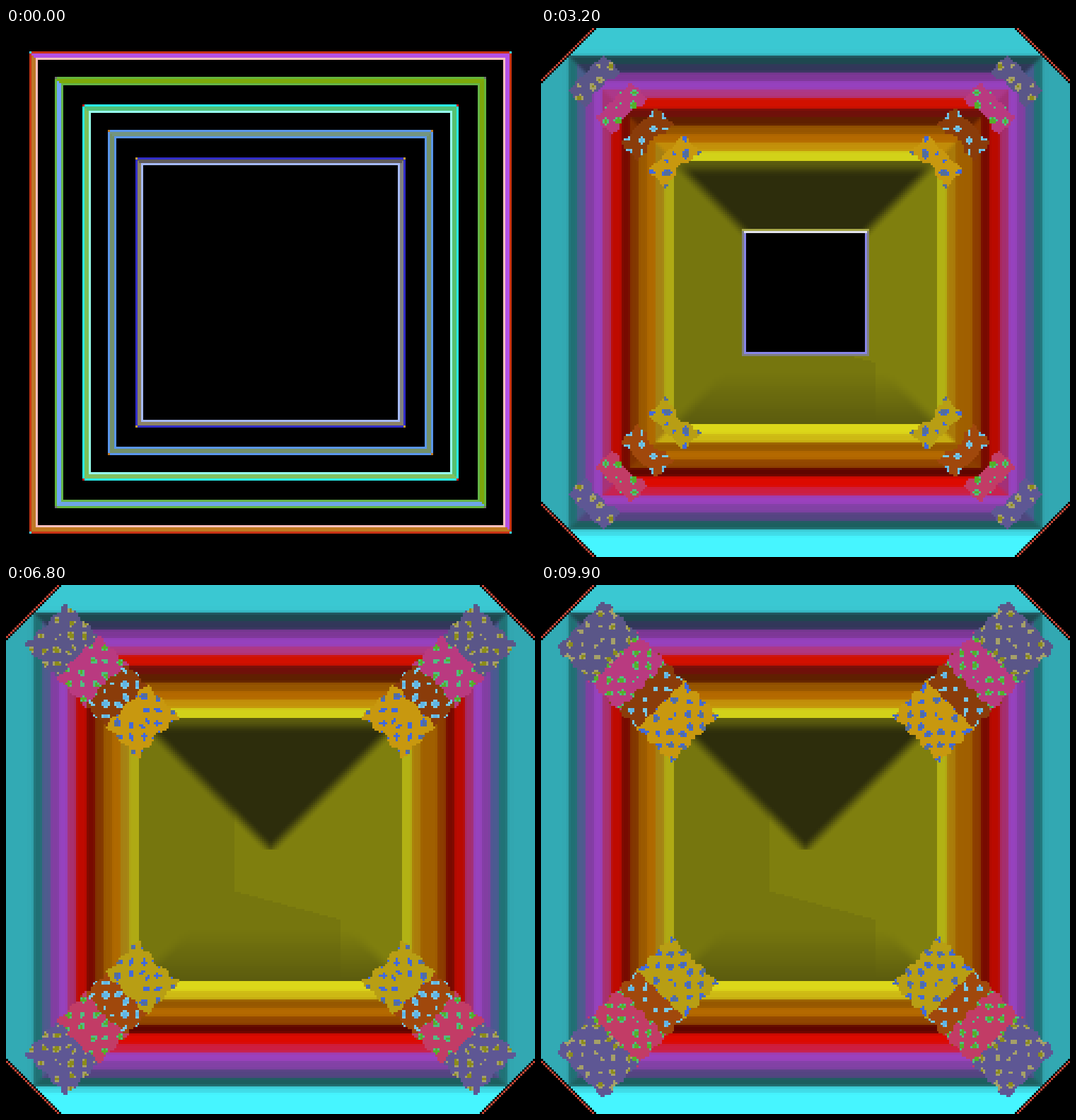
An HTML page with a canvas that plays this animation: 748 by 748 pixels, repeating every 10000 ms.

```html
<!DOCTYPE html>
<html lang="en">
<head>
<meta charset="utf-8">
<title>Growing squares</title>
<style>
  html, body { margin: 0; width: 100%; height: 100%; overflow: hidden; background: #000; }
  canvas { display: block; width: 100vw; height: 100vh; image-rendering: pixelated; }
</style>
</head>
<body>
<canvas id="stage" width="250" height="250"></canvas>
<script>
const N = 250, HALF = N / 2, STEP_MS = 100, STEPS = 100;
const ctx = document.getElementById('stage').getContext('2d');
const image = ctx.createImageData(N, N);

const rgb = hex => [0, 2, 4].map(i => parseInt(hex.slice(i, i + 2), 16));
const palette = text => text.split(' ').map(rgb);
const clamp = x => Math.max(0, Math.min(1, x));
const lerp = (a, b, t) => a + (b - a) * t;
const mix = (a, b, t) => a.map((v, i) => lerp(v, b[i], t));
const smooth = (lo, hi, x) => { const t = clamp((x - lo) / (hi - lo)); return t * t * (3 - 2 * t); };

// Each ring is four cells thick: outer line, two middle cells, inner line.
const RING_AT = [11, 23, 36, 48, 61];
const rings = [
  ['c83214', 'b450e6', 'be7828', 'b450e6', 'be7820', 'ffc0be', '40e0ff'],
  ['64b43c', '7daa0a', '6ea5fa', '7da50a', '6ea5e6', '64b446', '707070'],
  ['28f0f0', '50c078', '7cc05c', '58c070', '82c060', '96fff0', 'c81010'],
  ['5a96eb', '739580', '739069', '739069', '739069', '5a96eb', 'c07820'],
  ['322dc8', '5f5a5a', '8c8264', '808080', '8c8264', 'a5b9fa', 'c8a030'],
].map(([outer, top, left, right, bottom, inner, corner], i) => ({
  at: RING_AT[i],
  outer: rgb(outer), inner: rgb(inner), corner: rgb(corner),
  mid: { top: rgb(top), left: rgb(left), right: rgb(right), bottom: rgb(bottom) },
}));

// Colour bands from the stage edge inwards, one list per side.
const BAND_ENDS = [10, 13, 17, 21, 25, 29, 33, 38, 42, 46, 50, 54, 58, 63];
const bands = {
  top: palette('3ac8d2 3ac6d0 1e484f 32375a 7d3796 9641be af3782 d21000 70100a 5f2000 965500 b46900 c3910a d2d219'),
  left: palette('32aab4 32a8b2 207074 4e5c8e 823ea2 9642be a8306e be0a00 780a00 823700 9b5a00 af6900 a58214 afaa14'),
  right: palette('32a8b2 32a6b0 207276 4b5a91 823ea2 9642be a52d6e b90a00 780a00 8c3c00 a05f00 a06000 aa7d0a b2b214'),
  bottom: palette('46f5ff 40dae6 1c5f5f 554482 8241a5 9b41be cd1e41 dc0a00 5f0500 914600 b46900 965800 cdb914 dcd719'),
};
const OLIVE_LEFT = rgb('76760e'), OLIVE_RIGHT = rgb('7f7f0e');
const OLIVE_DARK = rgb('2d2d0c'), OLIVE_LOW = rgb('5c5c0e');

function band(side, e) {
  const pick = d => bands[side][BAND_ENDS.findIndex(end => Math.max(0, Math.min(62, d)) < end)];
  return mix(pick(e), mix(pick(e - 1), pick(e + 1), .5), .25);
}

function innerColor(x, y, u, v) {
  const right = x > 157 || (x > 107 && y < 144 + (x - 107) * .27);
  const wall = right ? OLIVE_RIGHT : OLIVE_LEFT;
  if (y < HALF) {
    const roof = mix(OLIVE_LOW, OLIVE_DARK, smooth(63, 70, v));
    return mix(wall, roof, smooth(-5, 5, u - v));
  }
  const floor = mix(OLIVE_LOW, wall, clamp((v - 63) / 24));
  return mix(wall, floor, smooth(-5, 5, u - v));
}

function settledColor(x, y, u, v) {
  let e = Math.min(u, v);
  if (e >= 63) return innerColor(x, y, u, v);
  // The chamfered corners keep the colour from the middle of their gap.
  for (let i = 1; i < rings.length; i++) {
    const prev = RING_AT[i - 1], at = RING_AT[i];
    if (e > prev && e < at && u + v <= 2 * at) e = Math.min(e, (prev + at) / 2);
  }
  const h = x < HALF ? 'left' : 'right', w = y < HALF ? 'top' : 'bottom';
  return mix(band(h, e), band(w, e), smooth(-2, 2, u - v));
}

const BLACK = [0, 0, 0], EDGE_RED = rgb('c84636');

function cornerColor(diagonal) {
  return diagonal === 24 ? EDGE_RED : BLACK;
}

function makeCell(x, y) {
  const u = Math.min(x, N - 1 - x), v = Math.min(y, N - 1 - y), e = Math.min(u, v);
  const cell = { u, v, e, born: Infinity, ring: null, outward: false };
  for (const ring of rings) {
    const outward = e < ring.at;
    if (outward && u + v < 2 * ring.at + 1) continue;
    const born = outward ? ring.at - e : Math.max(0, e - ring.at - 3);
    if (born < cell.born) Object.assign(cell, { born, ring, outward });
  }
  cell.side = v <= u ? (y < HALF ? 'top' : 'bottom') : (x < HALF ? 'left' : 'right');
  cell.color = u + v < 26 ? cornerColor(u + v) : settledColor(x, y, u, v);
  return cell;
}
const cells = Array.from({ length: N * N }, (_, i) => makeCell(i % N, Math.floor(i / N)));

const front = { wall: rgb('8785e6'), top: rgb('e1e1eb'), wallTrail: rgb('80807c'), topTrail: rgb('a5a546') };

function cellColor(c, step) {
  if (c.born > step) return BLACK;
  const { ring } = c, age = step - c.born, last = ring === rings[4] && !c.outward;
  if (step === 0) {
    if (c.u === c.v && c.e === ring.at) return ring.corner;
    if (c.e === ring.at) return ring.outer;
    return c.e === ring.at + 3 ? ring.inner : ring.mid[c.side];
  }
  if (last && c.born > 0 && age < 2) {
    const top = c.side === 'top';
    return age ? (top ? front.topTrail : front.wallTrail) : (top ? front.top : front.wall);
  }
  if (age === 0) return c.outward ? ring.outer : ring.inner;
  if (age === 1 && step < 6) return ring.mid[c.side];
  return c.color;
}

// Corner growths: step, outer edge, inner edge, half width, inner notch.
const GROWTH = [
  [6, 0, 1, 0, 0], [14, -.5, 4, 6, 0], [32, -2.5, 6, 8.8, 2], [42, -3.5, 8.5, 9.5, 2.5],
  [56, -4.7, 10, 9.6, 2], [79, -5, 11.6, 10.8, 0], [99, -5, 11.4, 11.6, 0],
];
const growths = [
  [3, '8a3c0a', 'a0480c', '78c8e6', '5fb4e6'],
  [2, 'b93a80', 'c23c66', '50be82', '55af28'],
  [1, '5a5688', '5e5794', 'a5a069', '8c8c19'],
  [4, 'c8980f', 'b89e14', '4169dc', '556e96'],
].map(([ring, top, bottom, light, deep]) => ({
  ring, at: RING_AT[ring], top: rgb(top), bottom: rgb(bottom), light: rgb(light), deep: rgb(deep),
}));

function growthSize(step) {
  const i = Math.max(1, GROWTH.findIndex(k => k[0] >= step));
  const a = GROWTH[i - 1], b = GROWTH[i], t = (step - a[0]) / (b[0] - a[0]);
  return a.map((value, j) => lerp(value, b[j], t));
}

function put(x, y, color) {
  const i = (y * N + x) * 4;
  image.data[i] = color[0];
  image.data[i + 1] = color[1];
  image.data[i + 2] = color[2];
  image.data[i + 3] = 255;
}

// Soft spots that drift with time: their rims are light, their cores deep.
function growthMark(g, a, q, step) {
  const spots = Math.sin(a * .95 + step * .31 + g.ring * 2) * Math.sin(q * 1.05 - step * .23 + g.ring)
    + .35 * Math.sin(a * q * .2 + step * .17);
  if (q < 1 || spots < .5) return null;
  return spots > .85 ? g.deep : g.light;
}

function drawGrowth(g, step) {
  const [, outer, inner, width, notch] = growthSize(step);
  for (let u = g.at - 18; u < g.at + 28; u++) {
    for (let v = g.at - 18; v < g.at + 28; v++) {
      const a = (u + v) / 2 - g.at, q = Math.abs(u - v) / 2;
      const ripple = .4 + .4 * Math.sin(a * 1.1 + g.ring + step * .06);
      const bump = .5 * Math.sin(q * 1.1 + g.ring);
      if (a < outer + bump || a > inner - notch * (1 - q / width) + bump || q > width - ripple) continue;
      const mark = growthMark(g, a, q, step);
      for (const x of [u, N - 1 - u]) {
        put(x, v, mark || g.top);
        put(x, N - 1 - v, mark || g.bottom);
      }
    }
  }
}

function draw(step) {
  cells.forEach((c, i) => put(i % N, Math.floor(i / N), cellColor(c, step)));
  if (step > 6) growths.forEach(g => drawGrowth(g, step));
  ctx.putImageData(image, 0, 0);
}

const start = performance.now();
let shown = -1;
function tick() {
  const step = Math.floor((performance.now() - start) / STEP_MS) % STEPS;
  if (step !== shown) draw(shown = step);
  requestAnimationFrame(tick);
}
tick();
</script>
</body>
</html>
```
